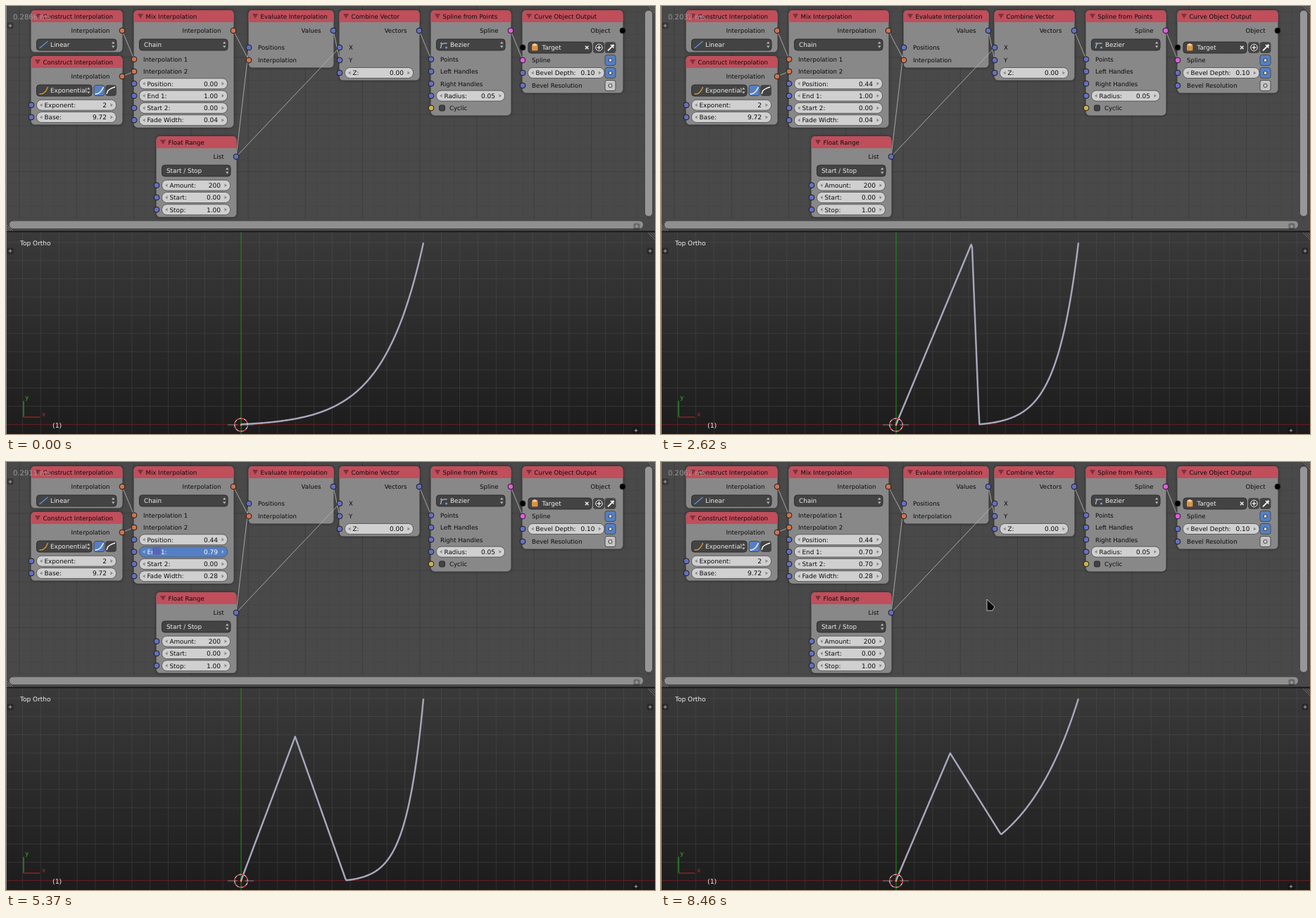
Recreate the animation shown at these times as an HTML page with a canvas. Size 922 by 608 pixels, loop 8.5 s.

```html
<!DOCTYPE html>
<html lang="en">
<head>
<meta charset="utf-8">
<title>Mix Interpolation</title>
<style>
html, body { margin: 0; width: 100%; height: 100%; overflow: hidden; background: #494949; }
canvas { display: block; }
</style>
</head>
<body>
<canvas id="stage" width="922" height="608"></canvas>
<script>
const c = document.getElementById('stage').getContext('2d');
const LOOP = 8500, PIXELS_PER_UNIT = 277;
const BLUE = '#6470c0', ORANGE = '#cf7350', PINK = '#e35ce3', YELLOW = '#cdb04a', BLACK = '#000';
const DARK = '#434343', ACTIVE = '#557fc4', INK = '#0c0c0c';

// Each drag changes one slider; `ms` is the execution time shown afterwards.
const DRAGS = [
  { name: 'Position', begin: 630, end: 2028, from: 0, to: .436, x: 241, y: 117, ms: .2032 },
  { name: 'Fade Width', begin: 2690, end: 3730, from: .04, to: .279, x: 246, y: 161, ms: .2069 },
  { name: 'End 1', begin: 4640, end: 5690, from: 1, to: .7, x: 272, y: 126, ms: .2071 },
  { name: 'Start 2', begin: 6300, end: 7773, from: 0, to: .704, x: 306, y: 141, ms: .2062 }
];
const ENTRY = { end: -80, from: 0, to: 0, x: 302, y: 152, ms: .2866 };
const EXIT = { begin: 8610, x: 463, y: 195 };

const lerp = (a, b, k) => a + (b - a) * k;
const clamp = k => Math.min(1, Math.max(0, k));
const smooth = k => k * k * (3 - 2 * k);
const valueAt = (d, t) => lerp(d.from, d.to, clamp((t - d.begin) / (d.end - d.begin)));

// The pointer rests after a drag, glides to the next slider, rests and hides on press.
function pointerAt(t) {
  const next = DRAGS.find(d => t < d.end) || EXIT;
  if (t >= next.begin) {
    const x = next.x + PIXELS_PER_UNIT * (valueAt(next, t) - next.from);
    return { x, y: next.y, dragging: next };
  }
  const last = DRAGS.filter(d => t >= d.end).pop() || ENTRY;
  const leave = last.end + 200, arrive = next.begin - 150;
  const k = smooth(clamp((t - leave) / (arrive - leave)));
  return {
    x: lerp(last.x + PIXELS_PER_UNIT * (last.to - last.from), next.x, k),
    y: lerp(last.y, next.y, k),
    visible: t >= 120 && t < next.begin - 80,
    ms: last.ms
  };
}

function text(s, x, y, { align = 'left', color = INK, size = 8.6 } = {}) {
  c.font = `${size}px "DejaVu Sans", sans-serif`;
  c.textAlign = align;
  c.fillStyle = color;
  c.fillText(s, x, y + 3.2);
}

function box(x, y, w, h, r, fill, stroke) {
  c.beginPath();
  c.roundRect(x, y, w, h, r);
  c.fillStyle = fill;
  c.fill();
  if (stroke) { c.strokeStyle = stroke; c.lineWidth = 1; c.stroke(); }
}

function line(points, color, width = 1) {
  c.beginPath();
  points.forEach(([x, y]) => c.lineTo(x, y));
  c.strokeStyle = color;
  c.lineWidth = width;
  c.stroke();
}

function shape(points, color) {
  c.beginPath();
  points.forEach(([x, y]) => c.lineTo(x, y));
  c.closePath();
  c.fillStyle = color;
  c.fill();
}

function disc(x, y, r, fill, stroke) {
  c.beginPath();
  c.arc(x, y, r, 0, 7);
  c.fillStyle = fill;
  c.fill();
  if (stroke) { c.strokeStyle = stroke; c.lineWidth = 1; c.stroke(); }
}

function cross(x, y, r, color, width) {
  line([[x - r, y], [x + r, y]], color, width);
  line([[x, y - r], [x, y + r]], color, width);
}

function plus(x, y) {
  box(x - 4.5, y - 4.5, 9, 9, 2.5, 'rgba(0,0,0,.28)');
  cross(x, y, 2.5, '#aaa');
}

function powerIcon(x, y, power, color) {
  const points = Array.from({ length: 9 }, (_, i) => [x - 6 + i * 1.5, y + 5 - 10 * (i / 8) ** power]);
  line(points, color, 1.4);
}

function button(right, y, fill) {
  box(right - 15.5, y - 7.5, 15, 15, 3, fill, '#4a4a4a');
}

function useInput(active) {
  return (right, y) => {
    button(right, y, active ? ACTIVE : '#c5c5c5');
    box(right - 10.2, y - 2.2, 4.5, 4.5, 1, '#ddd', '#333');
  };
}

// Node rows: each draws itself between the node's left and right edge.
const output = (name, color) => ({
  color, side: 1,
  draw: (l, r, y) => text(name, r - 17.5, y, { align: 'right' })
});

const input = (name, color, extra) => ({
  color,
  draw(l, r, y) {
    text(name, l + 13, y);
    if (extra) extra(r - 9.5, y);
  }
});

const menu = (name, icon, spare = 0, extra) => ({
  isMenu: true,
  draw(l, r, y) {
    const left = l + 7.5, right = r - 8 - spare;
    box(left, y - 8, right - left, 16, 4, DARK, '#2c2c2c');
    text(name, left + (icon ? 19.5 : 6.5), y, { color: '#eee', size: 8.8 });
    for (const s of [-1, 1])
      shape([[right - 7, y + 1.5 * s], [right - 2.5, y + 1.5 * s], [right - 4.7, y + 4.5 * s]], '#bbb');
    if (icon) icon(left + 10, y);
    if (extra) extra(r - 8, y);
  }
});

const field = (name, value, extra, pointer) => ({
  color: BLUE,
  draw(l, r, y) {
    const left = l + 7.5, right = r - (extra ? 26 : 8.5);
    const active = pointer && pointer.dragging && pointer.dragging.name === name;
    const hovered = pointer && pointer.visible && pointer.x > left && pointer.x < right
      && Math.abs(pointer.y - y) < 8.5;
    const color = active ? '#fff' : INK, tick = active ? '#9ab6e4' : '#8b8b8b';
    box(left, y - 7.5, right - left, 15, 7, active ? ACTIVE : hovered ? '#ececec' : '#d0d0d0', '#5b5b5b');
    for (const [x, s] of [[left + 6, 1], [right - 6, -1]])
      shape([[x + 2 * s, y - 2.5], [x + 2 * s, y + 2.5], [x - 1.5 * s, y]], tick);
    text(name + ':', left + 11, y, { color, size: 8.8 });
    text(value, right - 13.5, y, { align: 'right', color, size: 9 });
    if (extra) extra(r - 9.5, y);
  }
});

const checkbox = (name, color) => ({
  color,
  draw(l, r, y) {
    box(l + 11.5, y - 4, 8, 8, 2, DARK, '#2b2b2b');
    text(name, l + 26, y);
  }
});

const objectPicker = name => ({
  color: BLACK,
  draw(l, r, y) {
    box(l + 8, y - 8, 90, 16, 4, DARK, '#2c2c2c');
    box(l + 13, y - 4, 8.5, 8.5, 1.5, '#dd9442');
    shape([[l + 13, y - 4], [l + 17, y - 6], [l + 21.5, y - 4], [l + 17, y - 2]], '#f3cf9c');
    text(name, l + 27.5, y, { color: '#eee', size: 8.8 });
    for (const s of [-1, 1]) line([[l + 89, y - 2.2 * s], [l + 93.5, y + 2.2 * s]], '#eee', 1.5);
    button(r - 26, y, DARK);
    disc(r - 33.5, y, 4.8, DARK, '#eee');
    cross(r - 33.5, y, 3, '#eee', 1.3);
    button(r - 9.5, y, DARK);
    line([[r - 21, y + 4.5], [r - 15, y - 1.5]], '#eee', 1.8);
    line([[r - 17, y - 4], [r - 12.5, y + .5]], '#eee', 1.6);
    line([[r - 15, y - 1.5], [r - 12.5, y - 4]], '#eee', 2.8);
  }
});

function node(x, y, w, title, rows) {
  const spacing = rows.some(row => row.isMenu) ? 17.3 : 18;
  let at = y + 29;
  const heights = rows.map((row, i) => {
    if (i === 1) at += row.isMenu ? 20 : 24;
    else if (i > 1) at += rows[i - 1].isMenu ? 20.7 : spacing;
    return at;
  });
  c.shadowColor = 'rgba(0,0,0,.5)';
  c.shadowBlur = 4;
  box(x - .5, y, w + 1, at + 10.5 - y, 5.5, '#888');
  c.shadowBlur = 0;
  box(x - .5, y, w + 1, 17, [5.5, 5.5, 0, 0], '#c04e5b');
  shape([[x + 5, y + 5], [x + 13, y + 5], [x + 9, y + 12]], '#7b333b');
  text(title, x + 16.5, y + 8.5);
  rows.forEach((row, i) => row.draw(x, x + w, heights[i]));
  return rows.map((row, i) => ({ x: row.side ? x + w : x, y: heights[i], color: row.color }));
}

function nodeTree(values, pointer) {
  const slider = name => field(name, values[name].toFixed(2), null, pointer);
  const interpolation = output('Interpolation', ORANGE);
  const easeButtons = (right, y) => {
    button(right - 16.5, y, ACTIVE);
    powerIcon(right - 24.5, y, 2.5, '#fff');
    button(right, y, DARK);
    powerIcon(right - 8, y, .4, '#fff');
  };
  const bezierIcon = (x, y) => {
    line([[x - 4, y + 5], [x - 3, y], [x, y - 2], [x + 5, y - 2]], '#ddd');
    disc(x - 3, y - 2, 1.5, '#6f9fe0');
    disc(x + 4, y + 4, 1.5, '#6f9fe0');
  };
  const pins = [
    node(36, 6, 129, 'Construct Interpolation', [
      interpolation, menu('Linear', (x, y) => powerIcon(x, y, 1, '#5d94dd'))]),
    node(36, 71, 129, 'Construct Interpolation', [
      interpolation, menu('Exponential', (x, y) => powerIcon(x, y, 3, '#d39a35'), 35, easeButtons),
      field('Exponent', '2'), field('Base', '9.72')]),
    node(182, 6, 141, 'Mix Interpolation', [
      interpolation, menu('Chain'), input('Interpolation 1', ORANGE), input('Interpolation 2', ORANGE),
      ...['Position', 'End 1', 'Start 2', 'Fade Width'].map(slider)]),
    node(345, 6, 120, 'Evaluate Interpolation', [
      output('Values', BLUE), input('Positions', BLUE), input('Interpolation', ORANGE)]),
    node(474, 6, 113, 'Combine Vector', [
      output('Vectors', BLUE), input('X', BLUE), input('Y', BLUE), field('Z', '0.00')]),
    node(604, 6, 113, 'Spline from Points', [
      output('Spline', PINK), menu('Bezier', bezierIcon), input('Points', BLUE),
      input('Left Handles', BLUE), input('Right Handles', BLUE),
      field('Radius', '0.05'), checkbox('Cyclic', YELLOW)]),
    node(734, 6, 142, 'Curve Object Output', [
      output('Object', BLACK), objectPicker('Target'), input('Spline', PINK, useInput(true)),
      field('Bevel Depth', '0.10', useInput(true)), input('Bevel Resolution', BLUE, useInput(false))]),
    node(214, 185, 113, 'Float Range', [
      output('List', BLUE), menu('Start / Stop'),
      field('Amount', '200'), field('Start', '0.00'), field('Stop', '1.00')])
  ];
  // Links: output of a node to a row of another node
  [[0, 2, 2], [1, 2, 3], [2, 3, 2], [7, 3, 1], [7, 4, 1], [3, 4, 2], [4, 5, 2], [5, 6, 2]]
    .forEach(([from, to, row]) => {
      const a = pins[from][0], b = pins[to][row];
      line([[a.x, a.y], [b.x, b.y]], '#b0b0b0', .9);
    });
  pins.flat().filter(p => p.color).forEach(p => disc(p.x, p.y, 3.9, p.color, '#1c1c1c'));
}

function grid(x0, y0, step, top, bottom, color) {
  for (let x = x0 % step; x < 922; x += step) line([[x, top], [x, bottom]], color);
  for (let y = y0 - step * Math.floor((y0 - top) / step); y < bottom; y += step)
    line([[0, y], [922, y]], color);
}

function nodeEditor() {
  c.fillStyle = '#494949';
  c.fillRect(0, 0, 922, 320);
  grid(181.5, 73, 16.25, 0, 303, 'rgba(0,0,0,.05)');
  grid(181.5, 73, 81.25, 0, 303, 'rgba(0,0,0,.1)');
  box(907.5, 6, 11, 293, 5.5, '#979797', '#444');
  box(4.5, 305, 901, 11.5, 5.5, '#8f8f8f', '#444');
  plus(6, 28);
  plus(896, 313);
}

function exponential(x) {
  const low = 9.72 ** -2;
  return (9.72 ** (2 * (x - 1)) - low) / (1 - low);
}

function chain(x, values) {
  const position = values['Position'], end = values['End 1'], start = values['Start 2'];
  const half = Math.min(position, 1 - position, values['Fade Width'] / 2);
  const low = position - half, high = position + half;
  if (x < low) return end * x / low;
  if (x < high) return lerp(end, exponential(start), (x - low) / (high - low));
  return exponential(lerp(start, 1, (x - high) / (1 - high)));
}

function cursor3d(x, y) {
  line([[x - 19, y], [x - 5, y]], '#73888a');
  line([[x + 5, y], [x + 18, y]], '#73888a');
  c.beginPath();
  c.arc(x, y, 9.3, 0, 2 * Math.PI);
  c.strokeStyle = '#eee';
  c.lineWidth = 1.1;
  c.stroke();
  c.setLineDash([3.65, 3.65]);
  c.strokeStyle = '#e01c22';
  c.lineWidth = 1.4;
  c.stroke();
  c.setLineDash([]);
  disc(x, y, 1.4, '#e0a060');
}

function viewport(values) {
  const shade = c.createLinearGradient(0, 321, 0, 608);
  shade.addColorStop(0, '#3a3a3a');
  shade.addColorStop(1, '#1c1c1c');
  c.fillStyle = shade;
  c.fillRect(0, 320, 922, 288);
  grid(334, 594.5, 25.88, 321, 608, 'rgba(100,100,100,.28)');
  line([[0, 594.5], [922, 594.5]], '#661c20');
  line([[334, 321], [334, 608]], '#158a15');
  c.fillStyle = '#161616';
  c.fillRect(0, 319.5, 922, 1.8);

  const points = Array.from({ length: 200 }, (_, i) => {
    const x = i / 199;
    return [334 + 259 * x, 594.3 - 258 * chain(x, values)];
  });
  c.lineJoin = 'round';
  line(points, '#8d8da0', 2.6);
  line(points, '#b2b2c6', 1.3);
  c.lineJoin = 'miter';
  cursor3d(334, 595);

  text('Top Ortho', 20, 336.5, { color: '#eee', size: 9 });
  text('(1)', 66, 596, { color: '#eee', size: 9.3 });
  line([[25, 584], [25, 561]], '#2d9a2d', 1.3);
  line([[25, 584], [48, 584]], '#a02328', 1.3);
  text('y', 27, 556, { color: '#35a535', size: 9 });
  text('x', 51, 579.5, { color: '#b0282d', size: 9 });
  [[6, 348], [915, 348], [895, 603]].forEach(p => plus(...p));
  for (let d = 0; d < 10; d += 3.5) {
    line([[0, 310 + d], [10 - d, 320]], '#858585', .7);
    for (const y of [0, 322]) line([[912 + d, y], [922, y + 10 - d]], '#858585', .7);
  }
  line([[.5, 0], [.5, 608]], '#8c8c8c');
}

function executionTime(t, { ms }) {
  const noise = Math.abs(Math.sin(Math.floor(t / 45) * 12.9898) * 43758.5453) % 1;
  const shown = ms || .202 + .09 * noise * noise;
  text(`${shown.toFixed(4)} ms`, 10, 15.5, { color: 'rgba(165,165,165,.85)', size: 10 });
}

function drawPointer({ x, y, visible, dragging }) {
  if (dragging) box(x - 6, y - 5.5, 12, 11.5, 4, '#5566b8');
  if (!visible) return;
  shape([[0, 0], [11, 10.5], [8, 16], [0, 16]].map(([u, v]) => [x + u, y + v]), '#0a0a0a');
  c.strokeStyle = 'rgba(235,235,235,.75)';
  c.lineWidth = 1;
  c.stroke();
}

function draw(t) {
  const values = Object.fromEntries(DRAGS.map(d => [d.name, valueAt(d, t)]));
  const pointer = pointerAt(t);
  nodeEditor();
  nodeTree(values, pointer);
  executionTime(t, pointer);
  viewport(values);
  drawPointer(pointer);
}

c.textRendering = 'geometricPrecision';
const begin = performance.now();
function tick() {
  draw((performance.now() - begin) % LOOP);
  requestAnimationFrame(tick);
}
tick();
</script>
</body>
</html>
```
